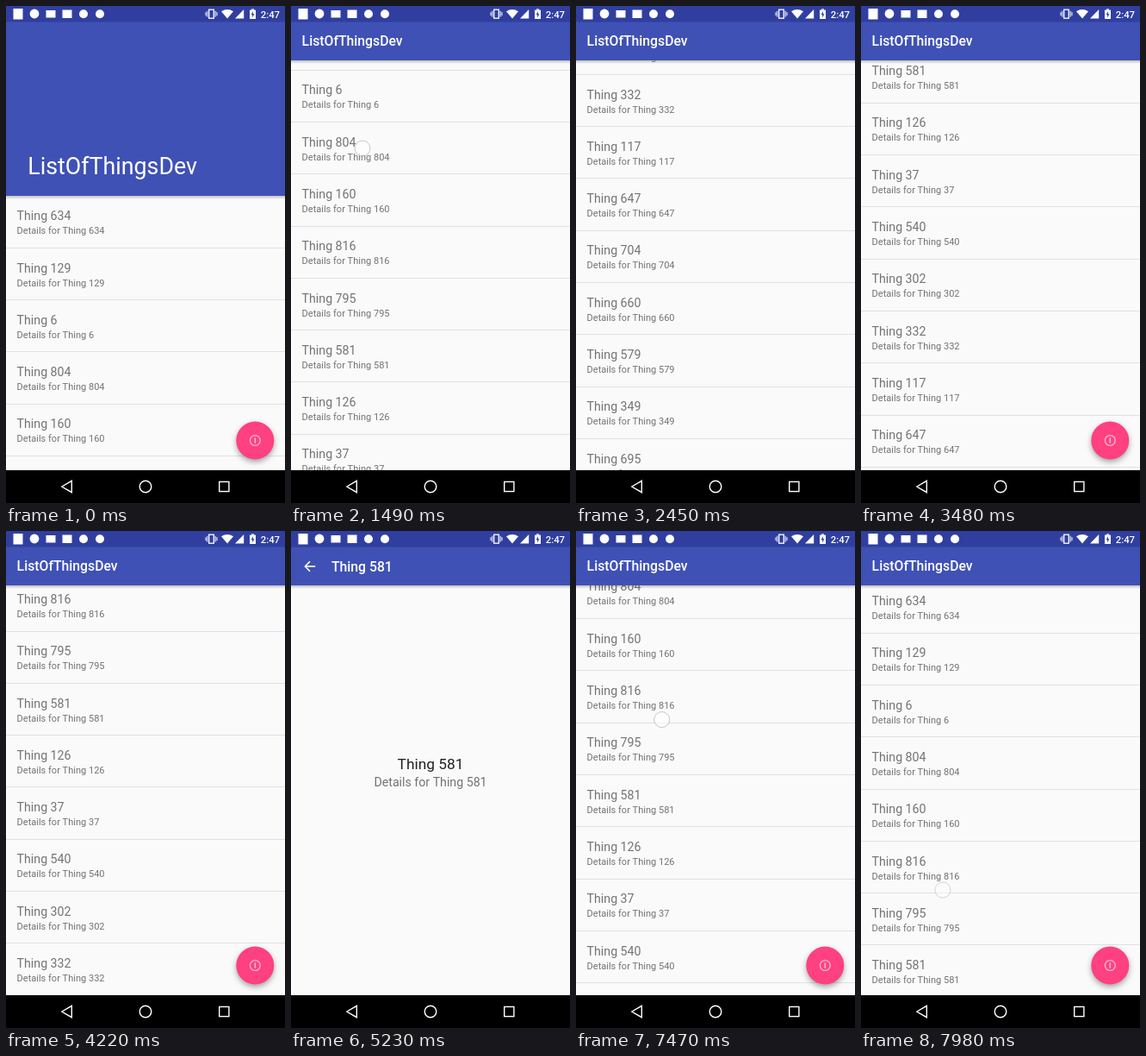
An HTML page with a canvas for the animation above (8000 ms loop, 324 by 576 pixels).

```html
<!DOCTYPE html>
<html lang="en">
<head>
<meta charset="utf-8">
<title>List of things</title>
<style>
html, body { margin: 0; width: 100%; height: 100%; overflow: hidden; background: #000; }
canvas { display: block; width: 324px; height: 576px; }
</style>
</head>
<body>
<canvas id="stage"></canvas>
<script>
const W = 324, H = 576, LOOP = 8000;
const NAV_TOP = 538, STATUS_H = 18.5, BAR_H = 63, HEADER_H = 220, ROW_H = 60.3;
const COLLAPSE = HEADER_H - BAR_H;
const PAGE = '#fafafa', BLUE = '#3f51b5', STATUS = '#303f9f', RED = '#ff4081';
const LIGHT = '#fff', GREY = '#737373', LINE = '#e1e1e5', ICON = '#ffb3cb';
const FONT = 'Roboto, "Open Sans", sans-serif';
const things = [634, 129, 6, 804, 160, 816, 795, 581, 126, 37,
  540, 302, 332, 117, 647, 704, 660, 579, 349, 695, 218];

const canvas = document.getElementById('stage');
const ctx = canvas.getContext('2d');
const dpr = window.devicePixelRatio || 1;
canvas.width = W * dpr;
canvas.height = H * dpr;

const clamp = v => Math.max(0, Math.min(1, v));
const lerp = (a, b, u) => a + (b - a) * u;
const span = (t, a, b) => clamp((t - a) / (b - a));
const easeIn = p => u => Math.pow(u, p);
const easeOut = p => u => 1 - Math.pow(1 - u, p);

// Cubic spline of a platform fling, solved for time by bisection.
function fling(u) {
  const curve = (x, a, b) => 3 * x * (1 - x) * ((1 - x) * a + x * b) + x * x * x;
  let lo = 0, hi = 1;
  for (let i = 0; i < 20; i++) {
    const mid = (lo + hi) / 2;
    if (curve(mid, .175, .35) < u) lo = mid; else hi = mid;
  }
  return curve(hi, .5, 1);
}

// Each move: start, end, distance scrolled from and to, easing.
const moves = [
  [870, 1490, 0, 264.8, easeIn(1.35)],
  [1490, 2540, 264.8, 866, fling],
  [2710, 3050, 866, 745, easeIn(1.25)],
  [3050, 4480, 745, 458.7, easeOut(2.17)],
  [7130, 7980, 458.7, 162.2, easeIn(1.2)]
];

// Each drag: start, release, final x, final y, scroll at release.
const drags = [
  [870, 1490, 83, 165, 264.8],
  [2710, 3050, 88, 380, 745],
  [7130, 7960, 95, 416, 162.2]
];
const taps = [[4670, 4770, 98, 208], [6040, 6130, 71, 557]];

function scrollAt(t) {
  let s = 0;
  for (const [a, b, from, to, ease] of moves)
    if (t >= a) s = lerp(from, to, ease(span(t, a, b)));
  return s;
}

function rect(x, y, w, h, color) {
  ctx.fillStyle = color;
  ctx.fillRect(x, y, w, h);
}

function disc(x, y, r, color) {
  ctx.fillStyle = color;
  ctx.beginPath();
  ctx.arc(x, y, r, 0, Math.PI * 2);
  ctx.fill();
}

function ring(x, y, r, color, width) {
  ctx.strokeStyle = color;
  ctx.lineWidth = width;
  ctx.beginPath();
  ctx.arc(x, y, r, 0, Math.PI * 2);
  ctx.stroke();
}

function path(points, close) {
  ctx.beginPath();
  points.forEach(([x, y], i) => i ? ctx.lineTo(x, y) : ctx.moveTo(x, y));
  if (close) ctx.closePath();
}

function text(str, x, y, size, color, weight = 400, align = 'left') {
  ctx.font = `${weight} ${size}px ${FONT}`;
  ctx.textAlign = align;
  ctx.fillStyle = color;
  ctx.fillText(str, x, y);
}

function shadow(y) {
  const g = ctx.createLinearGradient(0, y, 0, y + 4);
  g.addColorStop(0, 'rgba(0,0,0,.24)');
  g.addColorStop(1, 'rgba(0,0,0,0)');
  rect(0, y, W, 4, g);
}

function drawRows(t, s) {
  const first = Math.max(0, Math.floor((s - COLLAPSE) / ROW_H));
  for (let i = first; i < things.length; i++) {
    const y = HEADER_H + i * ROW_H - s;
    if (y > NAV_TOP) break;
    if (things[i] === 581) drawRipple(t, y);
    text('Thing ' + things[i], 12.6, y + 28.2, 14.18, GREY);
    text('Details for Thing ' + things[i], 12.6, y + 44.2, 11.03, GREY);
    rect(0, Math.round(y + ROW_H - .5), W, 1, LINE);
  }
}

function drawRipple(t, y) {
  const grow = span(t, 4690, 4960), fade = 1 - span(t, 4960, 5200);
  if (!grow || !fade) return;
  ctx.save();
  ctx.beginPath();
  ctx.rect(0, y, W, ROW_H);
  ctx.clip();
  disc(98, y + 30, 20 + 220 * grow, `rgba(0,0,0,${.12 * fade})`);
  ctx.restore();
}

function drawHeader(s) {
  const u = clamp(s / COLLAPSE), bottom = lerp(HEADER_H, BAR_H, u);
  shadow(bottom);
  rect(0, 0, W, bottom, BLUE);
  rect(0, 0, W, STATUS_H, STATUS);
  const size = lerp(26.8, 15.76, easeOut(2)(u));
  text('ListOfThingsDev', lerp(25.2, 12.6, u), lerp(195, 46.3, u), size, LIGHT, u > .95 ? 500 : 400);
}

function drawFab(t) {
  const k = t < 2000 ? 1 - span(t, 1280, 1470) : span(t, 2790, 2990);
  if (!k) return;
  ctx.save();
  ctx.translate(289.3, 503.5);
  ctx.scale(k, k);
  ctx.globalAlpha = k;
  ctx.shadowColor = 'rgba(0,0,0,.35)';
  ctx.shadowBlur = 6 * dpr;
  ctx.shadowOffsetY = 3 * dpr;
  disc(0, 0, 22, RED);
  ctx.shadowColor = 'transparent';
  ring(0, 0, 5.9, ICON, 1.4);
  rect(-.8, -3.2, 1.6, 6.4, ICON);
  ctx.restore();
}

function drawDetail(t) {
  const opening = t < 5600;
  const alpha = opening ? easeOut(2)(span(t, 4880, 5080)) : 1 - span(t, 6290, 6440);
  if (!alpha) return;
  const dy = 46 * (opening ? 1 - easeOut(4)(span(t, 4880, 5230)) : easeIn(2)(span(t, 6190, 6440)));
  ctx.save();
  ctx.globalAlpha = alpha;
  ctx.translate(0, dy);
  rect(0, BAR_H, W, NAV_TOP - BAR_H, PAGE);
  shadow(BAR_H);
  rect(0, STATUS_H, W, BAR_H - STATUS_H, BLUE);
  rect(0, 0, W, STATUS_H, STATUS);
  ctx.strokeStyle = LIGHT;
  ctx.lineWidth = 1.6;
  path([[22, 35.3], [16.4, 41], [22, 46.7]]);
  ctx.stroke();
  path([[16.6, 41], [28.2, 41]]);
  ctx.stroke();
  text('Thing 581', 47, 46.8, 15.76, LIGHT, 500);
  text('Thing 581', W / 2, 276.2, 17.34, '#212121', 400, 'center');
  text('Details for Thing 581', W / 2, 296, 14.18, GREY, 400, 'center');
  ctx.restore();
}

function drawStatus() {
  rect(8.5, 3, 11, 12.5, LIGHT);
  disc(33, 9, 5.4, LIGHT);
  rect(46.5, 5, 11, 8.5, LIGHT);
  rect(65.5, 4.5, 11, 9.5, LIGHT);
  disc(90, 9.2, 5, LIGHT);
  disc(109, 9.2, 5, LIGHT);

  ctx.strokeStyle = LIGHT;
  ctx.lineWidth = 1.3;
  ctx.strokeRect(235.7, 4.2, 5.6, 10);
  for (const [x, h] of [[232, 2], [233.8, 3.5], [243.2, 3.5], [245, 2]])
    rect(x - .5, 9.2 - h, 1, h * 2, LIGHT);

  ctx.fillStyle = LIGHT;
  ctx.beginPath();
  ctx.moveTo(257, 14.6);
  ctx.lineTo(250, 6.2);
  ctx.quadraticCurveTo(257, 1.6, 264, 6.2);
  ctx.fill();
  path([[266, 14.5], [276.2, 14.5], [276.2, 4]], true);
  ctx.fill();
  rect(283, 4.6, 7, 10.4, LIGHT);
  rect(285, 3.4, 3, 1.4, LIGHT);
  ctx.fillStyle = STATUS;
  path([[287, 6], [284.6, 10.3], [286.2, 10.3], [286, 13.4], [288.5, 9.2], [286.9, 9.2]], true);
  ctx.fill();
  text('2:47', 318, 13.7, 11.3, LIGHT, 500, 'right');
}

function drawNav(t) {
  rect(0, NAV_TOP, W, H - NAV_TOP, '#000');
  const press = span(t, 6040, 6200), fade = 1 - span(t, 6200, 6500);
  if (press && fade) {
    ctx.save();
    ctx.beginPath();
    ctx.rect(0, NAV_TOP, W, H - NAV_TOP);
    ctx.clip();
    disc(71, 557, 12 + 18 * press, `rgba(255,255,255,${.2 * fade})`);
    ctx.restore();
  }
  ctx.strokeStyle = LIGHT;
  ctx.lineWidth = 1.4;
  path([[64.8, 557], [76.3, 550.3], [76.3, 563.7]], true);
  ctx.stroke();
  ring(162, 557, 6.8, LIGHT, 1.4);
  ctx.strokeRect(247.7, 551.4, 11.2, 11.2);
}

function drawDot(x, y, alpha) {
  if (alpha <= 0) return;
  ctx.save();
  ctx.globalAlpha = alpha;
  disc(x, y, 9, 'rgba(255,255,255,.6)');
  ring(x, y, 9, 'rgba(110,110,120,.4)', 1);
  ctx.restore();
}

function drawTouches(t, s) {
  const strength = (a, b) => t < a ? 0 : .9 * (1 - span(t, b, b + 80));
  for (const [a, b, x, y, end] of drags)
    drawDot(x + 8 * (1 - span(t, a, b)), y + end - (t > b ? end : s), strength(a, b));
  for (const [a, b, x, y] of taps) drawDot(x, y, strength(a, b));
}

function draw(t) {
  const s = scrollAt(t);
  ctx.setTransform(dpr, 0, 0, dpr, 0, 0);
  rect(0, 0, W, H, PAGE);
  drawRows(t, s);
  drawHeader(s);
  drawFab(t);
  if (t > 4880 && t < 6440) drawDetail(t);
  drawStatus();
  drawNav(t);
  drawTouches(t, s);
}

const start = performance.now();
function tick() {
  draw((performance.now() - start) % LOOP);
  requestAnimationFrame(tick);
}
tick();
</script>
</body>
</html>
```
